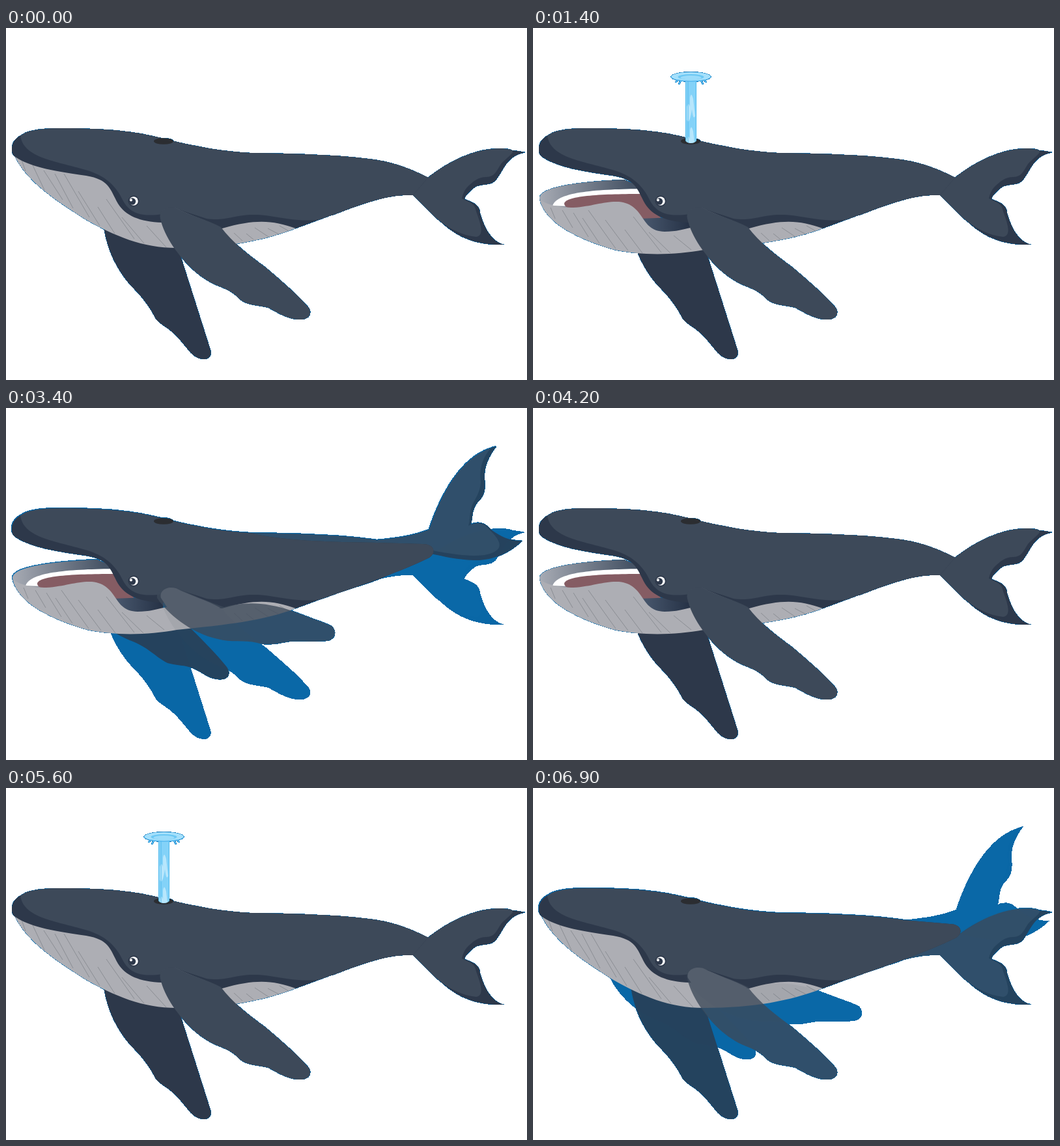
An HTML page with a canvas for the animation above (7000 ms loop, 800 px wide and 541 px high).

```html
<!DOCTYPE html>
<html lang="en">
<head>
<meta charset="utf-8">
<title>Whale</title>
<style>
html, body { margin: 0; width: 100%; height: 100%; overflow: hidden; background: #fff; }
canvas { display: block; }
</style>
</head>
<body>
<canvas width="800" height="541"></canvas>
<script>
const canvas = document.querySelector('canvas');
const stage = canvas.getContext('2d', { willReadFrequently: true });
const layer = canvas.cloneNode().getContext('2d');
let ctx = stage;
const SLATE = '#3d4959', NAVY = '#2d384a', GRAY = '#adaeb4', MATTE = [5, 107, 174];
const LOOP = 7000, BEAT = 700;

function fill(d, color) {
  ctx.fillStyle = color;
  ctx.fill(new Path2D(d));
}
function stroke(d, color, width = 1) {
  ctx.strokeStyle = color;
  ctx.lineWidth = width;
  ctx.stroke(new Path2D(d));
}
function oval(x, y, rx, ry, color) {
  ctx.fillStyle = color;
  ctx.beginPath();
  ctx.ellipse(x, y, rx, ry, 0, 0, Math.PI * 2);
  ctx.fill();
}
function fade(x0, x1, from, to) {
  const g = ctx.createLinearGradient(x0, 0, x1, 0);
  g.addColorStop(0, from);
  g.addColorStop(1, to);
  return g;
}

const limbs = {
  down: {
    far: 'M150 305C156 345 172 373 192 396C210 414 222 430 230 447C238 457 252 461 266 478C280 493 287 509 305 509C313 508 316 502 314 495L268 350L250 325Z',
    near: 'M237 293C234 281 247 272 262 277C280 287 310 295 330 306C348 330 372 348 400 369C430 395 448 410 465 430C471 440 464 448 453 448C436 449 421 440 403 430C390 426 371 427 359 417C346 402 330 399 316 392C285 375 268 352 256 335C247 321 240 307 237 293Z',
    tail() {
      fill('M500 196C550 199 605 209 648 230C680 204 730 177 797 191C768 198 767 214 752 234C742 244 728 238 718 246C709 254 705 258 704 263C717 268 728 272 728 285C735 308 745 328 765 333C730 334 702 326 677 306C656 289 640 270 625 257C585 254 540 273 500 288Z', NAVY);
      fill('M500 196C550 199 605 209 648 230C680 205 720 184 762 185C791 187 775 193 760 209C752 222 750 228 738 229C724 229 718 236 712 241C704 248 702 254 700 262C714 269 720 270 722 282C729 301 735 319 722 321C700 319 680 308 660 292L625 257C585 254 540 273 500 288Z', SLATE);
    }
  },
  up: {
    far: 'M119 293C128 312 145 330 162 342C172 349 181 353 190 357C218 367 230 383 248 392C262 396 275 395 287 400C302 406 310 416 326 417C342 419 346 408 339 398C325 380 305 360 288 343L270 325Z',
    near: 'M232 292C230 280 245 271 262 276C280 285 312 298 335 306C365 297 400 298 440 312C465 322 485 328 500 335C509 343 506 357 492 358C470 360 453 358 435 359C418 362 400 366 386 361C365 356 345 361 325 355C283 346 247 315 232 292Z',
    tail() {
      fill('M375 192C445 193 515 195 570 203C605 200 630 195 650 187C669 129 702 72 753 59C738 79 734 94 735 110C737 128 733 137 724 145C715 157 717 166 714 179C728 174 736 177 745 187C760 198 775 205 793 204C774 223 747 235 718 234C691 233 672 228 652 224C620 238 600 254 560 268L480 294Z', NAVY);
      fill('M375 192C445 193 515 195 570 203C605 200 630 195 650 187C669 129 700 76 744 62C729 81 727 96 729 114C728 130 721 138 716 149C711 162 713 172 710 181C725 174 735 177 742 187C754 198 764 211 753 219C738 231 701 228 655 219C620 233 595 251 540 270L480 290Z', SLATE);
    }
  }
};

const rear = {
  down: 'C600 208 625 218 648 230L625 257C585 254 540 273 480 295',
  cap: 'L640 209C657 209 662 222 650 230C605 252 560 267 480 295'
};

function torso(end, low) {
  const top = 'C185 155 215 163 258 174C310 186 340 190 375 192'
    + (low ? 'C420 204 500 206 570 207' : 'C445 193 515 195 570 203') + rear[end];
  fill('M9 186C9 166 32 154 90 154' + top + 'L445 308C410 296 385 293 332 308L240 299C205 298 183 288 172 270C159 246 158 233 123 227C65 219 35 212 14 198C9 194 9 190 9 186Z', NAVY);
  fill('M22 166C32 157 50 154 90 154' + top + 'C430 298 412 286 375 287C345 289 335 297 308 293L265 279L240 286C207 291 190 284 180 266C168 240 150 226 122 218C75 204 28 200 22 166Z', SLATE);
  // pale shoulder socket, seen through fading fins
  fill('M238 292C235 281 247 273 261 277C280 287 310 296 329 307L268 338Z', GRAY);
}

const belly = 'C340 338 395 327 445 308L400 285L330 295L240 290';
const backLines = 'M350 315L363 327M369 316L380 325M382 307L403 321M402 308L419 317M420 304L434 312';

function closedJaw() {
  fill('M11 192C30 237 82 268 120 293C167 320 210 338 262 338' + belly + 'L180 260L140 220Z', GRAY);
  stroke('M24 203L30 220M41 211L59 249M58 219L87 264M75 224L103 277M89 224L128 291M111 251L144 304M141 275L167 316M154 263L197 324M178 291L212 331M216 304L246 337' + backLines, '#8b8e94');
}

function openJaw() {
  fill('M10 262C9 244 70 236 140 233L180 250L180 285L20 280Z', fade(10, 150, '#a7abb4', '#465365'));
  fill('M30 273C38 251 100 248 170 247L185 275L100 276Z', '#fff');
  fill('M48 270C50 257 110 255 170 255L198 294L173 295L140 276L56 277Q48 275 48 270Z', '#855c63');
  fill('M165 293L240 290L242 312C215 320 185 318 165 293Z', fade(175, 240, '#45546a', '#263246'));
  fill('M10 263C20 272 42 276 62 276C92 274 108 266 132 267C174 272 163 312 202 313C220 313 232 309 242 307L330 290L400 285L445 308C395 327 340 333 262 341C218 349 168 350 125 341C70 325 18 300 10 263Z', GRAY);
  stroke('M27 276L34 293M45 280L61 307M62 284L85 321M76 292L102 331M85 280L127 339M111 295L146 342M141 310L168 346M154 290L197 345M178 314L211 346M216 319L243 341' + backLines, '#8b8e94');
}

function eye() {
  oval(196, 266, 8.5, 8.5, NAVY);
  oval(196, 266, 6.8, 6.8, '#fff');
  oval(194, 266.5, 5.2, 5.2, NAVY);
  oval(192, 264.5, 2, 2, '#fff');
}

function spout(top) {
  ctx.save();
  ctx.beginPath();
  ctx.rect(234, top + 9, 17, 163 - top);
  ctx.ellipse(242.5, 172, 8.5, 5, 0, 0, Math.PI);
  ctx.clip();
  fill('M234 0H251V180H234Z', '#83d2f8');
  for (let y = top + 46; y < 180; y += 50)
    fill(`M236 ${y + 28}V${y + 8}Q239 ${y} 241 ${y + 8}V${y - 6}Q243 ${y - 16} 246 ${y - 4}L249 ${y + 22}Q246 ${y + 30} 244 ${y + 12}Q240 ${y + 38} 236 ${y + 28}Z`, '#b7e6fc');
  stroke('M234.5 0V178M250.5 0V178M238 0V178', '#51b9ed');
  ctx.restore();
  for (const side of [-1, 1]) {
    const x = d => 242.5 + side * d;
    stroke(`M${x(13)} ${top + 13}Q${x(18)} ${top + 15} ${x(18)} ${top + 20}M${x(19)} ${top + 12}Q${x(23)} ${top + 14} ${x(23)} ${top + 17}`, '#58baf0', 2.2);
  }
  oval(242.5, top + 8, 31, 7.5, '#58baf0');
  oval(242.5, top + 7.5, 30, 6.5, '#a5e0fb');
  oval(242.5, top + 8.2, 20, 4.2, '#6bc8f4');
  oval(242.5, top + 9.2, 16, 3.2, '#9bdcfa');
}

// Visible pixels are flattened onto blue, which also gives the hard blue rim.
function flatten() {
  const image = ctx.getImageData(0, 0, 800, 541), px = image.data;
  for (let i = 0; i < px.length; i += 4) {
    const a = px[i + 3] / 255;
    if (a === 1) continue;
    if (a < 0.03) { px[i + 3] = 0; continue; }
    for (let c = 0; c < 3; c++) px[i + c] = px[i + c] * a + MATTE[c] * (1 - a);
    px[i + 3] = 255;
  }
  ctx.putImageData(image, 0, 0);
}

// Paints a group at full strength, then lays it on the stage with one opacity.
function group(alpha, paint) {
  ctx = layer;
  ctx.clearRect(0, 0, 800, 541);
  paint();
  ctx = stage;
  ctx.globalAlpha = alpha;
  ctx.drawImage(layer.canvas, 0, 0);
  ctx.globalAlpha = 1;
}

function draw(t) {
  const beat = Math.floor(t / BEAT), into = t % BEAT;
  const p = into < 200 ? 0 : (Math.floor(into / 100) - 1) / 6;
  const names = beat % 2 ? ['up', 'down'] : ['down', 'up'];
  const poses = [[names[0], (1 - p) ** 1.45], [names[1], p ** 1.45]].filter(([, a]) => a > 0);
  const eachPose = paint => poses.forEach(([name, a]) => group(a, () => paint(limbs[name])));
  const still = p === 0;
  const mostlyUp = poses.some(([name, a]) => name === 'up' && a > 0.5);

  ctx.clearRect(0, 0, 800, 541);
  eachPose(limb => fill(limb.far, NAVY));
  eachPose(limb => limb.tail());
  if (t >= 900 && t < 5100) openJaw(); else closedJaw();
  torso(still && names[0] === 'down' ? 'down' : 'cap', mostlyUp);
  oval(242, 174, 15, 4.8, '#2b2d31');
  eye();
  eachPose(limb => fill(limb.near, SLATE));

  if (!still) {
    // cross-fades bleed a pixel up and to the left
    ctx.globalCompositeOperation = 'destination-over';
    ctx.globalAlpha = 0.1;
    ctx.drawImage(canvas, -1, -1);
    ctx.globalAlpha = 1;
    ctx.globalCompositeOperation = 'source-over';
  }

  const start = [900, 5100].find(s => t >= s && t < s + BEAT);
  if (start) spout(67 * Math.min(Math.floor((t - start) / 100), 5) / 5);
  flatten();
}

let last = -1;
const origin = performance.now();
function tick() {
  const t = Math.floor((performance.now() - origin) % LOOP / 100) * 100;
  if (t !== last) draw(last = t);
  requestAnimationFrame(tick);
}
tick();
</script>
</body>
</html>
```
